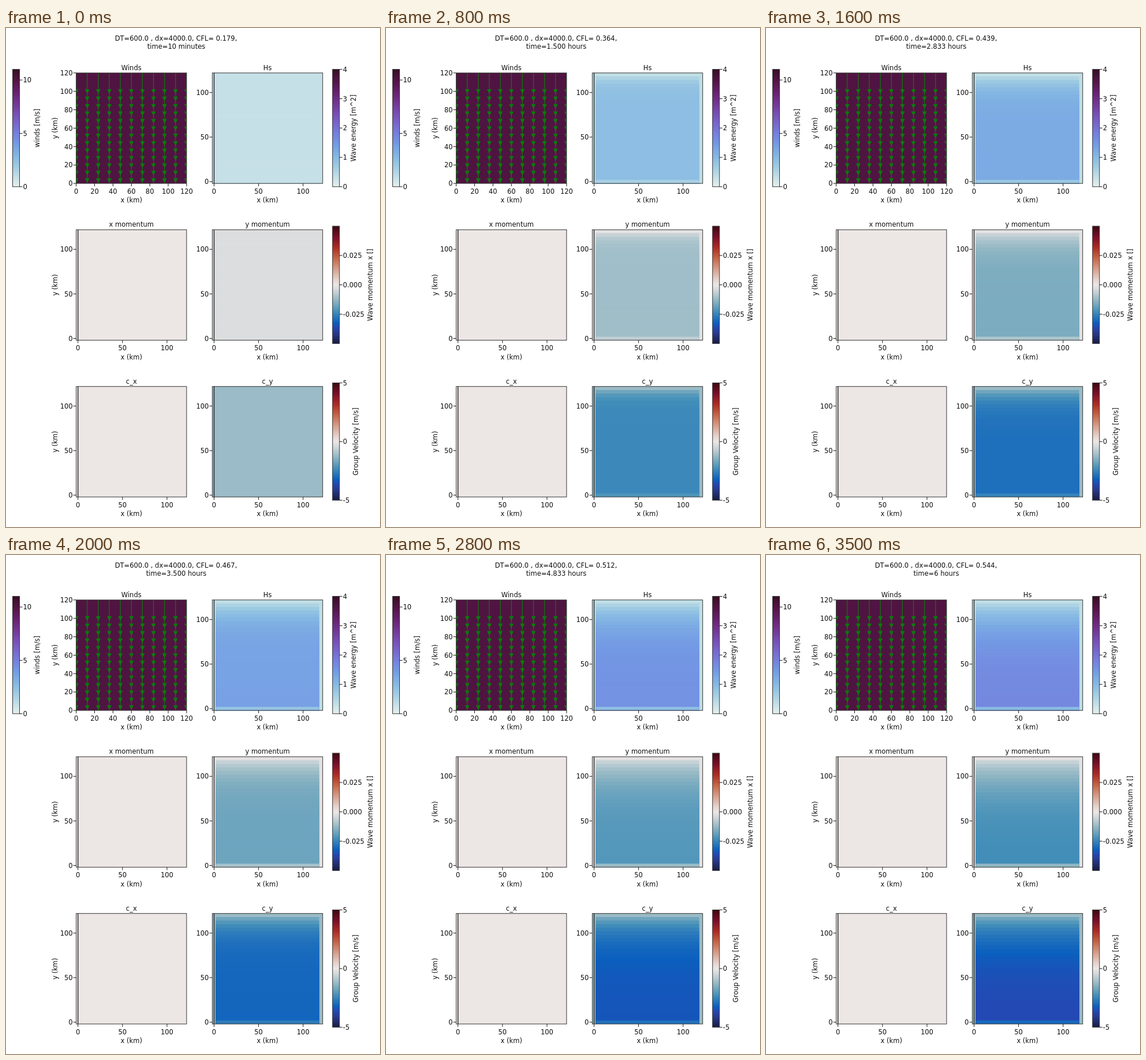
Animation of 648 by 864 pixels, one loop 3.6 s. Source, as an HTML page with a canvas:

```html
<!DOCTYPE html>
<html lang="en">
<head>
<meta charset="utf-8">
<title>Wave growth under steady wind</title>
<style>
html, body { margin: 0; width: 648px; height: 864px; overflow: hidden; background: #fff; }
canvas { display: block; }
</style>
</head>
<body>
<canvas id="stage" width="648" height="864"></canvas>
<script>
const g = document.getElementById('stage').getContext('2d');
const SIDE = 191.3, CELL = SIDE / 31, COLS = [121.6, 357.4], ROWS = [77.8, 349.3, 620.7];
const INK = '#181818';

// Colour maps: [position, r, g, b]
const even = list => list.map((c, i) => [i / (list.length - 1), ...c]);
const DENSE = even([[230, 240, 240], [191, 221, 229], [156, 201, 226], [129, 180, 227],
  [115, 154, 228], [117, 127, 221], [120, 100, 202], [119, 74, 175], [113, 50, 141],
  [100, 31, 104], [80, 20, 66], [54, 14, 36]]);
const BALANCE = [[0, 23, 28, 66], [.091, 41, 58, 143], [.14, 36, 72, 180], [.175, 11, 95, 190],
  [.273, 69, 144, 185], [.364, 142, 181, 194], [.455, 210, 216, 219], [.5, 236, 230, 229],
  [.545, 230, 210, 204], [.636, 213, 157, 137], [.727, 196, 101, 72], [.818, 172, 43, 36],
  [.909, 120, 14, 40], [1, 60, 9, 17]];

function colour(map, p) {
  let i = 1;
  while (i < map.length - 1 && p > map[i][0]) i++;
  const a = map[i - 1], b = map[i], f = (p - a[0]) / (b[0] - a[0]);
  return `rgb(${[1, 2, 3].map(n => Math.round(a[n] + (b[n] - a[n]) * f))})`;
}
const signed = (v, max) => colour(BALANCE, .5 + v / (2 * max));

function text(s, x, y, align = 'center') {
  g.fillStyle = '#111';
  g.textAlign = align;
  g.fillText(s, x, y + 4.2);
}
function sideText(s, x, y) {
  g.save();
  g.translate(x, y);
  g.rotate(-Math.PI / 2);
  text(s, 0, 0);
  g.restore();
}
function line(x1, y1, x2, y2, width = 1, style = INK) {
  g.lineWidth = width;
  g.strokeStyle = style;
  g.beginPath();
  g.moveTo(x1, y1);
  g.lineTo(x2, y2);
  g.stroke();
}
function frame(x, y, w, h) {
  g.lineWidth = 1;
  g.strokeStyle = '#333';
  g.strokeRect(x, y, w, h);
}

function axes(col, row, title, ticks, min, max) {
  const x = COLS[col], y = ROWS[row], bottom = y + SIDE;
  frame(x, y, SIDE, SIDE);
  for (const t of ticks) {
    const d = (t - min) / (max - min) * SIDE;
    line(x + d, bottom, x + d, bottom + 5);
    line(x - 5, bottom - d, x, bottom - d);
    text(t, x + d, bottom + 13.5);
    text(t, x - 6, bottom - d, 'right');
  }
  text(title, x + SIDE / 2, y - 9.3);
  text('x (km)', x + SIDE / 2, bottom + 29);
  if (!col) sideText('y (km)', 84.5, y + SIDE / 2);
}

function colourBar(x, row, map, ticks, min, max, label, labelX) {
  const y = ROWS[row] - 6.2, h = 203.2;
  const ramp = g.createLinearGradient(0, y + h, 0, y);
  for (const [p, ...rgb] of map) ramp.addColorStop(p, `rgb(${rgb})`);
  g.fillStyle = ramp;
  g.fillRect(x, y, 12, h);
  frame(x, y, 12, h);
  for (const t of ticks) {
    const ty = y + h * (max - t) / (max - min);
    line(x + 12, ty, x + 17, ty);
    text(max < 1 ? t.toFixed(3) : t, x + 18, ty, 'left');
  }
  sideText(label, labelX, y + h / 2);
}

function winds() {
  const x = COLS[0], y = ROWS[0], green = '#0a7a0a';
  g.save();
  g.beginPath();
  g.rect(x, y, SIDE, SIDE);
  g.clip();
  g.fillStyle = colour(DENSE, 10 / 11);
  g.fillRect(x, y, SIDE, SIDE);
  for (let i = 0; i <= 10; i++) {
    const cx = x + i * SIDE / 10;
    line(cx, y, cx, y + SIDE, 1.2, green);
    g.fillStyle = green;
    for (let j = 0; j < 13; j++) {
      const cy = 110 + j * 12.85;
      g.beginPath();
      g.moveTo(cx - 4, cy - 4);
      g.lineTo(cx + 4, cy - 4);
      g.lineTo(cx, cy + 4);
      g.fill();
    }
  }
  g.restore();
}

// Rim in one colour, inner rows painted downwards by their distance from the top
function field(col, row, rim, rowColour) {
  const x = COLS[col], y = ROWS[row];
  g.fillStyle = rim;
  g.fillRect(x, y, SIDE, SIDE);
  if (rowColour) for (let r = 1; r <= 30; r++) {
    g.fillStyle = rowColour(r);
    g.fillRect(x + CELL, y + r * CELL, 29 * CELL, (31 - r) * CELL);
  }
  line(x + 3.1, y, x + 3.1, y + SIDE, 1.3);
}

// Courant number by minute, interpolated on log axes
const GROWTH = [[10, .179], [30, .259], [90, .364], [170, .439], [250, .491], [330, .531], [360, .544]];
function courant(t) {
  let i = 1;
  while (t > GROWTH[i][0]) i++;
  const [t0, c0] = GROWTH[i - 1], [t1, c1] = GROWTH[i];
  return c0 * (c1 / c0) ** (Math.log(t / t0) / Math.log(t1 / t0));
}
function duration(min) {
  if (min < 60) return min + ' minutes';
  const h = min / 60;
  return h === 1 ? '1 hour' : (min % 60 ? h.toFixed(3) : h) + ' hours';
}

function draw(step) {
  const minutes = 10 * (step + 1), cfl = courant(minutes), top = cfl / .15;
  // Group speed: limited by duration or by fetch
  const speed = r => (top ** -12 + (1.75 * r ** .27) ** -12) ** (-1 / 12);
  const mix = (start, v, f, r) => r === 30 ? start + f * (v - start) : v;
  const height = r => mix(.3, .228 * speed(r) ** 1.57, .5, r);
  const momentum = r => mix(.003, .00218 * speed(r) ** 1.85, .5, r);
  const velocity = r => mix(1.2, speed(r), .77, r);

  g.fillStyle = '#fff';
  g.fillRect(0, 0, 648, 864);
  g.font = '11.5px "DejaVu Sans", sans-serif';
  text(`DT=600.0 , dx=4000.0, CFL= ${cfl.toFixed(3)},`, 294.5, 18);
  text(`time=${duration(minutes)}`, 295, 31.5);

  winds();
  field(1, 0, colour(DENSE, (step ? .35 : .3) / 4), r => colour(DENSE, height(r) / 4));
  field(0, 1, signed(0, 1));
  field(1, 1, signed(step ? -.0015 : -.003, .05), r => signed(-momentum(r), .05));
  field(0, 2, signed(0, 1));
  field(1, 2, signed(-1.2, 5), r => signed(-velocity(r), 5));

  axes(0, 0, 'Winds', [0, 20, 40, 60, 80, 100, 120], 0, 120);
  [[1, 0, 'Hs'], [0, 1, 'x momentum'], [1, 1, 'y momentum'], [0, 2, 'c_x'], [1, 2, 'c_y']]
    .forEach(a => axes(...a, [0, 50, 100], -2, 122));

  colourBar(11.5, 0, DENSE, [0, 5, 10], 0, 11, 'winds [m/s]', 54);
  colourBar(565.8, 0, DENSE, [0, 1, 2, 3, 4], 0, 4, 'Wave energy [m^2]', 602);
  colourBar(565.8, 1, BALANCE, [-.025, 0, .025], -.05, .05, 'Wave momentum x []', 631);
  colourBar(565.8, 2, BALANCE, [-5, 0, 5], -5, 5, 'Group Velocity [m/s]', 606);
}

let shown = -1;
function tick() {
  const step = Math.floor(performance.now() % 3600 / 100);
  if (step !== shown) draw(shown = step);
  requestAnimationFrame(tick);
}
tick();
</script>
</body>
</html>
```
